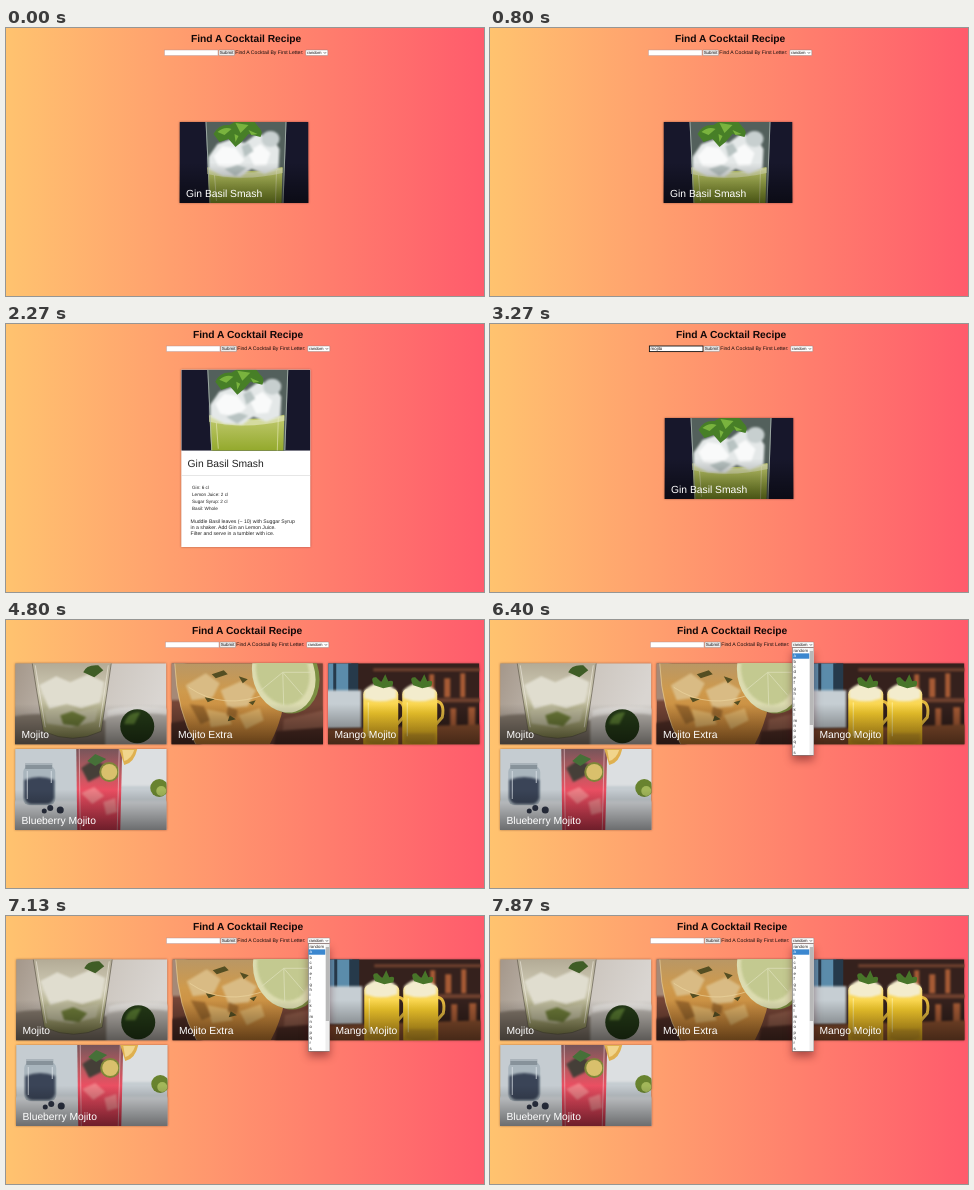
Write an HTML page that moves like this. It is 478 px wide and 268 px high and loops after 8 s.

```html
<!DOCTYPE html>
<html lang="en">
<head>
<meta charset="utf-8">
<title>Find A Cocktail Recipe</title>
<style>
html, body { margin: 0; width: 100%; height: 100%; overflow: hidden; }
body { background: linear-gradient(to right, #ffc36f, #ff5b6c); }
svg { display: block; width: 100%; height: 100%; }
text { font-family: "Liberation Sans", Arial, sans-serif; text-rendering: geometricPrecision; white-space: pre; }
.card { filter: drop-shadow(0 .8px .9px rgba(60, 20, 20, .45)); }
.menu { filter: drop-shadow(0 5px 4px rgba(60, 0, 10, .42)); }
.soft { filter: blur(1.2px); }
</style>
</head>
<body>
<svg id="stage" viewBox="0 0 478 268" preserveAspectRatio="none">
<defs>
  <linearGradient id="shade" x2="0" y2="1">
    <stop offset=".5" stop-opacity="0"/><stop offset="1" stop-opacity=".5"/>
  </linearGradient>
  <linearGradient id="lime" x2="0" y2="1">
    <stop stop-color="#c3cb72"/><stop offset="1" stop-color="#93a92c"/>
  </linearGradient>
  <linearGradient id="pale" x2="0" y2="1">
    <stop stop-color="#b3ab96"/><stop offset=".4" stop-color="#d0ccb6"/><stop offset=".75" stop-color="#a5a377"/><stop offset="1" stop-color="#85844f"/>
  </linearGradient>
  <linearGradient id="amber" x2="0" y2="1">
    <stop stop-color="#b99765"/><stop offset=".35" stop-color="#cf9a4c"/><stop offset="1" stop-color="#c57d30"/>
  </linearGradient>
  <linearGradient id="mango" x2="0" y2="1">
    <stop stop-color="#f8e18a"/><stop offset=".4" stop-color="#fbd02e"/><stop offset="1" stop-color="#f2b51f"/>
  </linearGradient>
  <linearGradient id="berry" x2="0" y2="1">
    <stop stop-color="#77555a"/><stop offset=".3" stop-color="#bd5a60"/><stop offset=".5" stop-color="#ea4f62"/><stop offset="1" stop-color="#dc3c54"/>
  </linearGradient>
  <linearGradient id="wall" x2="1" y2=".2">
    <stop stop-color="#a4978a"/><stop offset=".5" stop-color="#c9c2ba"/><stop offset="1" stop-color="#d9d5d1"/>
  </linearGradient>

  <symbol id="gin" viewBox="0 0 129 81">
    <path fill="#17172b" d="M0 0h129v81H0z"/>
    <path fill="#53605c" d="M26 0h81l-3 81H30z"/>
    <path fill="url(#lime)" d="M28 45q38 8 75 0l-1 36H30z"/>
    <path fill="#d5dba0" d="M28 46q38 9 75 0v5q-38 9-75 1z"/>
    <g class="soft">
      <path fill="#e4e8e8" d="M29 35l9-13 14-5 13 4 12-9 15 3 8 12-1 20-14 5-13-5-11 8-18-1-14-7z"/>
      <path fill="#f9fafa" d="M34 34l9-10 13 2 9 12-10 9-16-3zM68 30l13-8 10 9-4 12-12 1z"/>
      <path fill="#b8c3c2" d="M62 24l7-3 5 8-9 6zM45 47l13-4 9 3-11 8z"/>
      <ellipse cx="91" cy="17" rx="9" ry="8" fill="#c7cfcf"/>
    </g>
    <path fill="#477f27" d="M34 12q5-10 16-9l5-3h20l4 5q5 4 2 10l-12-3-7 8-6 5-7-8-9 3z"/>
    <path fill="#79b33e" d="M38 10q7-6 14-3l-7 6zM56 1l13 2-8 8zM69 8l9 4-6 1zM55 12l4 2-3 6z"/>
    <path fill="none" stroke="#aeb9b4" d="M26.5 0l4 81M106.5 0l-3 81" opacity=".8"/>
    <path fill="none" stroke="#e9ecbd" d="M97 48l-1 33M35 53l2 26" opacity=".6"/>
  </symbol>

  <symbol id="mojito" viewBox="0 0 151 81">
    <path fill="url(#wall)" d="M0 0h151v81H0z"/>
    <g class="soft">
      <path fill="#81766a" d="M-4 54q30-8 100 4v27H-4z"/>
      <path fill="#b9b4ae" d="M90 55q30-8 66-3v33H90z"/>
      <path fill="#e3e0dc" d="M92 47q30-7 64-1v6q-32-6-64 1z"/>
    </g>
    <path fill="url(#pale)" d="M17 0h79l-10 68q-30 14-58 0z"/>
    <g class="soft">
      <path fill="#e0ddcf" d="M24 22l17-9 14 6 18-8 16 8-4 20-19 6-14-4-18 5z"/>
      <path fill="#bcb99b" d="M29 47l22-6 12 7 20-4-3 14-24 6-25-4z"/>
      <path fill="#6c7a38" d="M45 52l12-4 14 6-8 9-15-2z"/>
    </g>
    <path fill="#3f5d26" d="M68 9q3-8 15-7l5 5-9 7z"/>
    <path fill="none" stroke="#5d5648" d="M17 0l11 68q30 14 58 0L96 0" opacity=".65"/>
    <path fill="none" stroke="#eeeade" d="M20 2l10 62M93 2l-9 62" opacity=".6"/>
    <circle cx="122" cy="63" r="17" fill="#243a17"/>
    <path class="soft" fill="#54752f" d="M109 61q2-12 16-12l-6 12z"/>
  </symbol>

  <symbol id="extra" viewBox="0 0 151 81">
    <path fill="#754536" d="M0 0h151v81H0z"/>
    <g class="soft">
      <path fill="#a58977" d="M-3-3h16l8 40H-3z"/>
      <path fill="#8d5a48" d="M112 56l44-10v30l-46 3z"/>
      <path fill="#4f2d25" d="M104 68l52-4v20h-54zM-3 60l24-4 9 28H-3z"/>
    </g>
    <path fill="url(#amber)" d="M3 0h112q2 45-17 81H24Q5 48 3 0z"/>
    <g class="soft">
      <path fill="#d9bb84" d="M14 22l20-12 14 10-7 14-21 3zM49 27l20-9 15 9-8 16-20 2z"/>
      <path fill="#deb066" d="M35 46l20 4 5 11-21 3zM67 52l21-7 4 12-18 9z"/>
      <path fill="#9c692d" d="M18 41l14 2 6 14-9 4zM56 43l10 4-2 8-9-3z"/>
    </g>
    <path fill="#544e22" d="M40 11l12-4 4 4-12 4zM33 34l10 2-7 3zM67 13l9 3-5 4zM58 52l6 4-8 2zM77 39l7-2-3 5z"/>
    <path fill="none" stroke="#eed9a4" d="M3 0q2 48 21 81M17 24q35 24 79 6" opacity=".6"/>
    <ellipse cx="115" cy="11" rx="32" ry="40" transform="rotate(-18 115 11)" fill="#7d9043"/>
    <ellipse cx="112" cy="11" rx="31" ry="39" transform="rotate(-18 112 11)" fill="#dcdcb0"/>
    <ellipse class="soft" cx="111" cy="9" rx="26" ry="33" transform="rotate(-18 111 9)" fill="#c3c990"/>
    <path stroke="#dcdfb8" d="M111 9l-22 18M111 9l1 34M111 9l20 23M111 9h28" opacity=".8"/>
  </symbol>

  <symbol id="jar" viewBox="0 0 40 70" overflow="visible">
    <path fill="none" stroke="#e3b83f" stroke-width="3" d="M34 25q10 0 7 16l-7 8"/>
    <rect x="1" y="13" width="35" height="60" rx="5" fill="url(#mango)"/>
    <g class="soft">
      <path fill="#f3eccd" d="M2 14q16-15 32 0v8q-16 6-32 0z"/>
      <path fill="#c9982a" d="M3 57h31v9q-15 6-31 0z" opacity=".6"/>
    </g>
    <path fill="none" stroke="#fff2a4" d="M6 26v34" opacity=".8"/>
    <path fill="#487529" d="M12 9q-5-9 2-8l5 5 4-8 3 7q7-2 4 5l-9 2z"/>
  </symbol>
  <symbol id="mangos" viewBox="0 0 151 81">
    <path fill="#35211d" d="M0 0h151v81H0z"/>
    <path fill="#5b8cab" d="M0 0h23v30H0z"/>
    <path fill="#263a4b" d="M5 0h3v30H5zM20 0h10v30H20z"/>
    <path class="soft" fill="#c6ced3" d="M-3 27h36v38H-3z"/>
    <g class="soft">
      <path fill="#70422f" d="M45 5h110v3H45zM108 35h48v4h-48z"/>
      <path fill="#a65b35" d="M101 11h5v23h-5zM116 15h6v19h-6zM132 10h5v24h-5zM122 45h6v18h-6zM140 44h7v20h-7z"/>
      <path fill="#8c512f" d="M-3 66l160-5v24H-3z"/>
    </g>
    <use href="#jar" x="34" y="13" width="40" height="70"/>
    <use href="#jar" x="73" y="13" width="40" height="70"/>
  </symbol>

  <symbol id="blueberry" viewBox="0 0 151 81">
    <path fill="#c5ccd1" d="M0 0h151v81H0z"/>
    <g class="soft">
      <path fill="#dcdfe1" d="M104-3h50v40h-50z"/>
      <path fill="#d7dadd" d="M-3 52h158v33H-3z"/>
    </g>
    <rect x="8" y="17" width="32" height="39" rx="6" fill="#a9b5bd"/>
    <path fill="#87929a" d="M10 14h27v6H10z"/>
    <g class="soft">
      <path fill="#3a4457" d="M9 31q15-6 30 0v18q-2 6-8 6H17q-6 0-8-6z"/>
    </g>
    <path fill="none" stroke="#dce3e8" d="M12 22v28M10 15h27M36 22v12" opacity=".8"/>
    <g fill="#303749"><circle cx="35" cy="59" r="3"/><circle cx="45" cy="61" r="3.500"/><circle cx="29" cy="62" r="2.500"/></g>
    <path fill="url(#berry)" d="M61 0h46l-2 81H62z"/>
    <g class="soft">
      <path fill="#453f38" d="M66 19l12-8 10 4-3 12-12 6z"/>
      <path fill="#ef7f86" d="M66 44l13-6 10 9-12 8zM88 53l12-4 2 14-11 3z"/>
    </g>
    <path fill="#467038" d="M72 12l8-7 11 5-11 7z"/>
    <circle cx="94" cy="23" r="10" fill="#7e8638"/><circle cx="94" cy="23" r="8" fill="#d9c06c"/>
    <path fill="none" stroke="#edc6cb" d="M64 0l1 81M104 0l-2 81" opacity=".6"/>
    <path fill="#dfb04f" d="M104 0h18q-3 14-13 16z"/><path fill="#f1d58c" d="M107 1h12q-3 9-10 11z"/>
    <ellipse cx="144" cy="39" rx="9" ry="9" fill="#68832f"/><ellipse cx="146" cy="42" rx="5" ry="5" fill="#a2b75a"/>
  </symbol>
</defs>
</svg>
<script>
const LOOP = 8000;
const stage = document.getElementById('stage');

const rect = (x, y, w, h, fill, extra = '') =>
  `<rect x="${x}" y="${y}" width="${w}" height="${h}" fill="${fill}" ${extra}/>`;
const text = (x, y, size, value, fill = '#120c0c', extra = '') =>
  `<text x="${x}" y="${y}" font-size="${size}" fill="${fill}" ${extra}>${value}</text>`;
const photo = (id, x, y, w) => `<use href="#${id}" x="${x}" y="${y}" width="${w}" height="81"/>`;

function header(typed = '') {
  const border = typed ? '#151515' : '#a88';
  return text(186, 14, 10.25, 'Find A Cocktail Recipe', '#120808', 'font-weight="bold"') +
    rect(159.4, 22, 53.6, 5.6, '#fff', `stroke="${border}" stroke-width="${typed ? .9 : .4}"`) +
    text(160.6, 26.3, 4.4, typed) +
    rect(213.8, 22, 15.8, 5.6, '#efefef', 'rx=".7" stroke="#777" stroke-width=".4"') +
    text(214.7, 26.3, 4.4, 'Submit') +
    text(230.3, 26.4, 5.1, 'Find A Cocktail By First Letter:') +
    rect(300.8, 22, 22, 5.6, '#fff', 'rx=".7" stroke="#777" stroke-width=".4"') +
    text(302.2, 26.2, 4.2, 'random') +
    '<path d="M318.7 24.2l1.2 1.2 1.2-1.2" fill="none" stroke="#222" stroke-width=".6"/>';
}

const card = (id, title, x, y, w) => `<g class="card">${photo(id, x, y, w)}` +
  rect(x, y, w, 81, 'url(#shade)') + text(x + 6.5, y + 75, 10.3, title, '#fff') + '</g>';

const ginCard = card('gin', 'Gin Basil Smash', 174.5, 94, 129);

function recipe() {
  const parts = ['Gin: 6 cl', 'Lemon Juice: 2 cl', 'Sugar Syrup: 2 cl', 'Basil: Whole'];
  const steps = ['Muddle Basil leaves (~ 10) with Suggar Syrup',
    'in a shaker. Add Gin an Lemon Juice.', 'Filter and serve in a tumbler with ice.'];
  return `<g class="card">${rect(174.3, 45.7, 129, 177.3, '#fff')}${photo('gin', 174.3, 45.7, 129)}</g>` +
    text(180.6, 142.6, 10.3, 'Gin Basil Smash', '#222') +
    rect(174.3, 151, 129, .6, '#d5d5d5') +
    parts.map((s, i) => text(185, 165.3 + i * 7, 4.63, s, '#222')).join('') +
    steps.map((s, i) => text(183.6, 198.6 + i * 6, 5.15, s, '#222')).join('');
}

const results = card('mojito', 'Mojito', 9, 43.3, 151.5) +
  card('extra', 'Mojito Extra', 165.5, 43.3, 151.5) +
  card('mangos', 'Mango Mojito', 322, 43.3, 151.5) +
  card('blueberry', 'Blueberry Mojito', 9, 129, 151.5);

function menu() {
  const row = 5.36;
  const options = ['random', ...'abcdefghijklmnopqrs'];
  return `<g class="menu">${rect(301.3, 27.8, 21.3, 107.5, '#fff', 'stroke="#555" stroke-width=".5"')}</g>` +
    rect(301.5, 28 + row, 17, row, '#3b87cf') +
    options.map((s, i) => text(302.4, 32 + i * row, 4.3, s, i === 1 ? '#fff' : '#222')).join('') +
    rect(318.5, 28, 4, 107, '#eee') + rect(318.8, 31, 3.4, 74, '#b8b8b8');
}

// Each scene: start time, horizontal offset, content
const scenes = [
  [0, -1, header() + ginCard],
  [1600, 1, header() + recipe()],
  [3200, 0, header('mojito') + ginCard],
  [4800, 0, header() + results],
  [6400, 1, header() + results + menu()]
];

stage.insertAdjacentHTML('beforeend', scenes.map(([, dx, body]) =>
  `<g class="scene" transform="translate(${dx} 0)">${body}</g>`).join(''));
const groups = [...stage.querySelectorAll('.scene')];
const start = performance.now();

function draw() {
  const t = (performance.now() - start) % LOOP;
  const current = scenes.findLastIndex(([at]) => t >= at);
  groups.forEach((g, i) => { g.style.display = i === current ? '' : 'none'; });
  requestAnimationFrame(draw);
}
draw();
</script>
</body>
</html>
```
